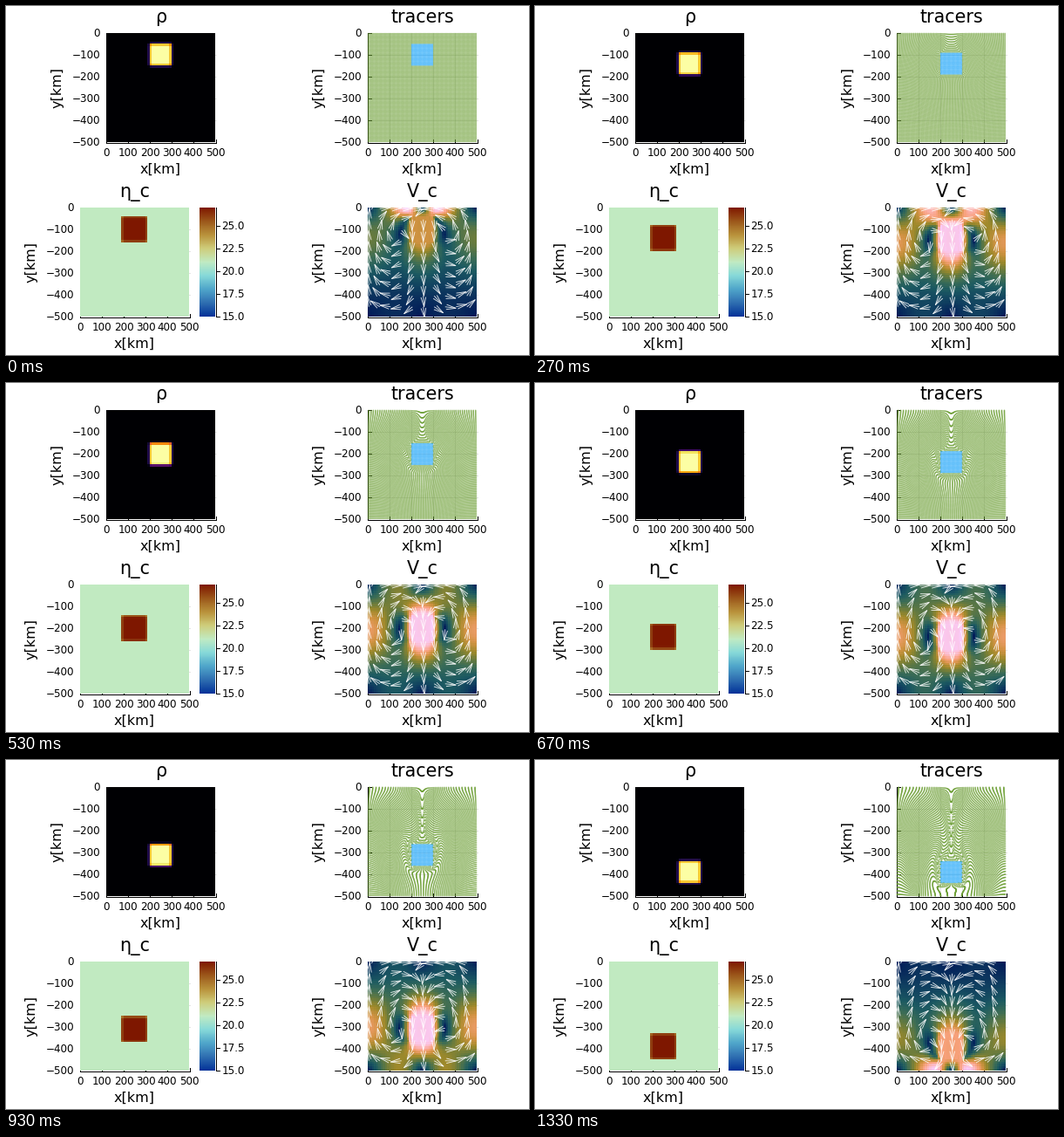
Recreate the animation shown at these times as a matplotlib script. Size 600 px wide and 400 px high, loop 1.4 s.

```python
import numpy as np
import matplotlib.pyplot as plt
from matplotlib.animation import FuncAnimation
from matplotlib.collections import LineCollection
from matplotlib.colors import LinearSegmentedColormap
from matplotlib.patches import Rectangle

LOOP_MS, TICK_MS = 1400, 20
STEPS = 21        # pictures in one loop
KM = 500          # domain size
SIDE = 125        # panel size in pixels
CELL = 10         # grid cell in km
MODES = 48
PT = 0.72         # points per pixel

BATLOW = LinearSegmentedColormap.from_list("batlow", [
    "#011959", "#103F60", "#1C5A62", "#3C6D56", "#687B3E",
    "#9D892B", "#D29343", "#F8A17B", "#FDB7BC", "#FACCFA"])
ROMA = LinearSegmentedColormap.from_list("roma", [
    "#023198", "#2F6FB1", "#4FA5CA", "#86D9D9", "#C1EBC3",
    "#CFCD7B", "#B9923B", "#9C581B", "#7E1700"])


# ---------- sinking rigid block in a free-slip box ----------

def block_top(step):
    return 200 + 194.5 * np.tanh(0.0965 * (step - 10.6))


k = np.pi * np.arange(1, MODES + 1)
k4 = ((k[:, None] ** 2 + k[None, :] ** 2) ** 2).ravel()


def trig(p):
    arg = np.outer(p, k)
    return np.sin(arg), np.cos(arg)


def solve_flow(top):
    """Stream function modes for a block sinking with unit speed."""
    s = np.arange(10) * 0.02
    one = np.ones(10)
    x = np.concatenate([0.4 + s, 0.6 * one, 0.6 - s, 0.4 * one])
    y = top / KM + np.concatenate([0 * one, s, 0.2 * one, 0.2 - s])
    (sx, cx), (sy, cy) = trig(x), trig(y)
    bx = sx[:, :, None] * (cy * k)[:, None, :]
    by = -(cx * k)[:, :, None] * sy[:, None, :]
    basis = np.concatenate([bx, by]).reshape(2 * len(x), -1)
    green = (basis / k4) @ basis.T
    goal = np.repeat([0.0, 1.0], len(x))
    force = np.linalg.lstsq(green, goal, rcond=1e-7)[0]
    return (basis.T @ force / k4).reshape(MODES, MODES)


def velocity(modes, pos):
    (sx, cx), (sy, cy) = trig(pos[:, 0] / KM), trig(pos[:, 1] / KM)
    vx = ((sx @ (modes * k)) * cy).sum(1)
    vy = -((cx @ (modes * k[:, None])) * sy).sum(1)
    return np.column_stack([vx, vy])


def hat_cdf(u):
    u = np.clip(u, -1, 1)
    return 0.5 + u - 0.5 * u * np.abs(u)


centers = np.arange(CELL / 2, KM, CELL)


def coverage(start):
    """Share of the block in each cell row or column."""
    return (hat_cdf((start + 100 - centers) / CELL)
            - hat_cdf((start - centers) / CELL))


def lattice(points):
    gx, gy = np.meshgrid(points, points)
    return np.column_stack([gx.ravel(), gy.ravel()])


cells = lattice(centers)
arrow_pos = lattice(np.arange(5, KM, 50))
tracers = lattice(np.arange(2.5, KM, 5))
in_block = ((np.abs(tracers[:, 0] - 250) < 50)
            & (np.abs(tracers[:, 1] - 100) < 50))


def advect(pos, step):
    """Midpoint step of all tracers to the next picture."""
    fall = block_top(step + 1) - block_top(step)
    half = pos + velocity(solve_flow(block_top(step)), pos) * fall / 2
    mid = solve_flow(block_top(step + 0.5))
    new = np.clip(pos + velocity(mid, half) * fall, 0, KM)
    new[in_block] = pos[in_block] + [0, fall]
    return new


def make_state(step, pos):
    top = block_top(step)
    modes = solve_flow(top)
    share = np.outer(coverage(top), coverage(200))
    speed = np.hypot(*velocity(modes, cells).T)
    v = velocity(modes, arrow_pos)
    v /= np.maximum(np.hypot(v[:, 0], v[:, 1]), 1e-9)[:, None]
    return dict(rho=share,
                eta=np.log10(share * 1e27 + (1 - share) * 1e21),
                speed=(speed / speed.max()).reshape(len(centers), -1),
                heading=v, tracers=pos)


states = []
for n in range(STEPS):
    states.append(make_state(n, tracers))
    if n < STEPS - 1:
        tracers = advect(tracers, n)


# ---------- drawing, in pixel coordinates ----------

plt.rcParams["font.family"] = "DejaVu Sans"
fig = plt.figure(figsize=(6, 4), dpi=100, facecolor="white")
ax = fig.add_axes([0, 0, 1, 1])
ax.axis("off")


def label(x, y, text, px, **kw):
    kw = {"ha": "center", "va": "baseline", **kw}
    ax.text(x, y, text, fontsize=px * PT, color="black", **kw)


def line(xs, ys, alpha=1):
    ax.plot(xs, ys, color="black", lw=PT, alpha=alpha, zorder=-1)


def panel(x0, y0, title):
    """Axes lie under the data, so only their outer edge stays visible."""
    mid = x0 + SIDE / 2
    left, base, right = x0 - 0.5, y0 + SIDE + 0.5, x0 + SIDE + 0.5
    line([left, left, right], [y0 - 0.5, base, base])
    for km in range(0, KM + 1, 100):
        x = left + km / KM * (SIDE + 1)
        y = y0 - 0.5 + km / KM * (SIDE + 1)
        line([x, x], [base, base - 4])
        line([left, left + 4], [y, y])
        if 0 < km < KM:
            line([x, x], [y0, base], alpha=0.1)
            line([left, right], [y, y], alpha=0.1)
        label(x0 + km / 4, base + 15.3, str(km), 12)
        text = f"\u2212{km}" if km else "0"
        label(x0 - 7, y0 + km / 4 + 3.9, text, 12, ha="right")
    label(mid + 0.5, y0 - 12.2, title, 20.7)
    label(mid, base + 35.3, "x[km]", 16)
    label(x0 - 55.5, y0 + SIDE / 2, "y[km]", 16, va="center", rotation=90)


def heatmap(x0, y0, data, cmap, lo, hi, width=SIDE):
    return ax.imshow(data, cmap=cmap, vmin=lo, vmax=hi, aspect="auto",
                     interpolation="nearest", zorder=1,
                     extent=(x0, x0 + width, y0 + SIDE, y0))


def to_px(pos, x0, y0):
    return pos / 4 + [x0, y0]


RHO, TRC, ETA, VEL = (115, 31), (415, 31), (85, 231), (415, 231)
for origin, title in ((RHO, "ρ"), (TRC, "tracers"), (ETA, "η_c"), (VEL, "V_c")):
    panel(*origin, title)

first = states[0]
rho_map = heatmap(*RHO, first["rho"], "inferno", 0, 1)
eta_map = heatmap(*ETA, first["eta"], ROMA, 15, 27)
vel_map = heatmap(*VEL, first["speed"], BATLOW, 0, 1)

# colour bar
heatmap(222, 231, np.linspace(27, 15, 256)[:, None], ROMA, 15, 27, 18)
line([240.5, 240.5], [231, 356])
for value in (15, 17.5, 20, 22.5, 25):
    y = 356 - (value - 15) / 12 * SIDE
    line([240.5, 245], [y, y])
    label(247.6, y + 3.9, f"{value:.1f}", 12, ha="left")

dot_colors = np.where(in_block, "#009AFA", "#6B9E32")
dots = ax.scatter(*to_px(first["tracers"], *TRC).T, s=(1.6 * PT) ** 2,
                  c=dot_colors, alpha=0.55, linewidths=0, zorder=3)

arrows = LineCollection([], colors="white", linewidths=0.9 * PT,
                        alpha=0.85, zorder=4)
ax.add_collection(arrows)
arrows.set_clip_path(Rectangle(VEL, SIDE, SIDE, transform=ax.transData))

ax.set_xlim(0, 600)
ax.set_ylim(400, 0)


def arrow_lines(heading, length=12.5, head=11, half=2.8):
    tail = to_px(arrow_pos, *VEL)
    tip = tail + heading * length
    side = heading[:, ::-1] * [-half, half]
    neck = tip - heading * head
    shafts = np.stack([tail, tip], axis=1)
    heads = np.stack([neck + side, tip, neck - side], axis=1)
    return list(shafts) + list(heads)


def update(i):
    # pictures start on whole hundredths of a second
    now = i * TICK_MS + 15
    state = states[int(now * STEPS / LOOP_MS)]
    rho_map.set_data(state["rho"])
    eta_map.set_data(state["eta"])
    vel_map.set_data(state["speed"])
    dots.set_offsets(to_px(state["tracers"], *TRC))
    arrows.set_segments(arrow_lines(state["heading"]))
    return rho_map, eta_map, vel_map, dots, arrows


anim = FuncAnimation(fig, update, frames=LOOP_MS // TICK_MS, interval=TICK_MS,
                     repeat=True, repeat_delay=0, blit=False)
plt.show()
```
